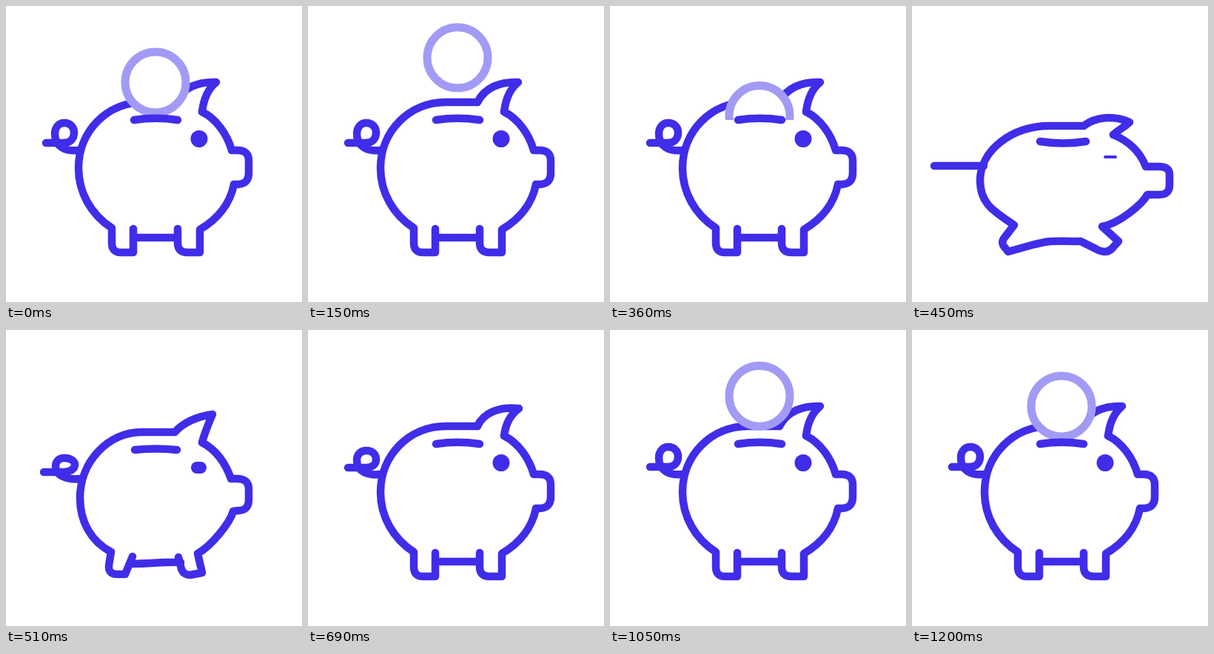
An HTML page for the animation above (1.26 s loop, 400 by 400 pixels).

```html
<!DOCTYPE html>
<html>
<head>
<meta charset="utf-8">
<title>Piggy bank</title>
<style>
  html, body { margin: 0; width: 100%; height: 100%; overflow: hidden; background: #fff; }
  svg { display: block; width: 100vw; height: 100vh; }
</style>
</head>
<body>
<svg viewBox="0 0 400 400">
  <clipPath id="above"><path id="cut"/></clipPath>
  <g fill="none" stroke="#402de9" stroke-width="10.5" stroke-linecap="round" stroke-linejoin="round">
    <path id="body"/>
    <path id="ear"/>
    <path id="tail"/>
    <g clip-path="url(#above)">
      <circle id="coin" cx="202" cy="103" r="41" fill="#fff" stroke="#a29bf5" stroke-width="11"/>
    </g>
    <path id="slot"/>
  </g>
  <rect id="eye" fill="#402de9"/>
</svg>
<script>
const LOOP = 1260, STEP = 30;
const $ = id => document.getElementById(id);
const clamp = u => Math.min(1, Math.max(0, u));
const smooth = u => (1 - Math.cos(Math.PI * u)) / 2;
const easeOut = u => 1 - (1 - u) ** 2;

// Poses of one part share the same path commands, so their numbers can be blended.
const poses = {
  body: {
    rest: `M229 130 L186 130 C137 130 98 169 98 219 C98 252 115 282 143 300
      L143 320 Q143 333 155 333 L172 333 L172 301 M172 313 C192 313 212 313 232 313
      M232 301 L232 320 Q232 333 245 333 L262 333 L262 302 C286 288 303 267 308 241
      L314 241 Q328 240 328 226 L328 209 Q328 195 313 195 L305 195 C299 174 285 153 265 143`,
    squash: `M232 162 L186 162 C135 162 92 195 92 236 C92 268 112 278 138 296
      L125 313 Q119 320 126 327 L130 332 L162 323 M162 323 C190 316 188 318 228 318
      M228 318 L248 328 Q262 336 270 328 L279 318 L257 298 C280 294 311 268 318 255
      L334 255 Q348 255 348 242 L348 228 Q348 217 334 217 L316 217 C308 197 292 182 272 174`,
    rebound: `M228 138 L183 138 C138 138 100 178 100 227 C100 258 114 285 142 300
      L139 318 Q138 330 150 330 L161 330 L171 306 M171 316 C195 316 215 313 236 314
      M233 307 L236 319 Q238 331 249 331 L265 328 L259 302 C277 292 302 262 307 245
      L314 244 Q328 244 328 229 L328 215 Q328 201 312 201 L304 201 C297 181 284 162 265 152`
  },
  ear: {
    rest: 'M229 130 C239 110 260 102 284 103 C273 112 267 126 265 143',
    squash: 'M232 162 C249 149 273 148 294 157 C288 163 278 168 272 174',
    rebound: 'M228 138 C240 125 258 117 279 114 C273 128 268 140 265 152',
    settle: 'M229 130 C237 112 258 103 285 106 C274 114 267 127 265 143'
  },
  tail: {
    rest: 'M98 195 C80 197 66 190 66 173 C66 163 72 158 79 158 C87 158 92 164 92 171 C92 180 86 185 78 185 L54 185',
    squash: 'M97 216 C90 216 80 216 75 216 C70 216 66 216 62 216 C58 216 54 216 50 216 C46 216 42 216 40 216 L30 216',
    rebound: 'M101 201 C85 203 67 198 67 184 C67 177 72 173 79 173 C87 173 93 177 93 182 C93 188 86 192 78 192 L51 192',
    settle: 'M98 195 C80 197 66 191 66 176 C66 167 72 163 79 163 C87 163 92 168 92 175 C92 182 86 186 78 186 L54 186'
  },
  slot: {
    rest: 'M173 154 Q202 149.5 232 154',
    squash: 'M173 183 Q204 188 235 183',
    rebound: 'M174 162 Q202 159 231 162'
  },
  // centre x, centre y, width, height
  eye: { rest: '261 179.5 23 23', squash: '268 204 18 4', rebound: '260.5 186 21 16' }
};
const keys = [[370, 'rest'], [450, 'squash'], [510, 'rebound'], [600, 'settle'], [690, 'settle'], [740, 'rest']];

function mix(a, b, u) {
  const to = b.match(/[\d.]+/g);
  let i = 0;
  return a.replace(/[\d.]+/g, n => +n + (to[i++] - n) * u);
}

function poseAt(part, t) {
  const pose = name => poses[part][name] || poses[part].rest;
  const next = keys.findIndex(k => t < k[0]);
  if (next < 1) return pose('rest');
  const [t0, from] = keys[next - 1], [t1, to] = keys[next];
  return mix(pose(from), pose(to), smooth((t - t0) / (t1 - t0)));
}

function coinAt(t) {
  if (t < 195) return { y: 103 - 35 * easeOut(t / 195), scale: 1 };
  if (t < 600) return { y: 68 + 26 * ((t - 195) / 105) ** 2.5, scale: 1 };
  const lift = t < 990 ? easeOut(clamp((t - 945) / 45)) : 1 - smooth(clamp((t - 990) / 210));
  return { y: 103 - 17 * lift, scale: easeOut(clamp((t - 810) / 150)) };
}

function draw(t) {
  for (const part of ['body', 'ear', 'tail', 'slot']) $(part).setAttribute('d', poseAt(part, t));

  const [x, y, w, h] = poseAt('eye', t).split(' ').map(Number);
  const box = { x: x - w / 2, y: y - h / 2, width: w, height: h, rx: h / 2 };
  for (const name in box) $('eye').setAttribute(name, box[name]);

  const slotY = poseAt('slot', t).match(/[\d.]+/g)[1];
  $('cut').setAttribute('d', `M0 -50 H400 V${slotY} H0 Z`);
  const coin = coinAt(t);
  $('coin').setAttribute('transform',
    `translate(202 ${coin.y + 46.5}) scale(${coin.scale}) translate(-202 -149.5)`);
  $('coin').style.display = coin.scale > 0 ? '' : 'none';
}

function tick() {
  draw(Math.floor(performance.now() % LOOP / STEP) * STEP);
  requestAnimationFrame(tick);
}
tick();
</script>
</body>
</html>
```
